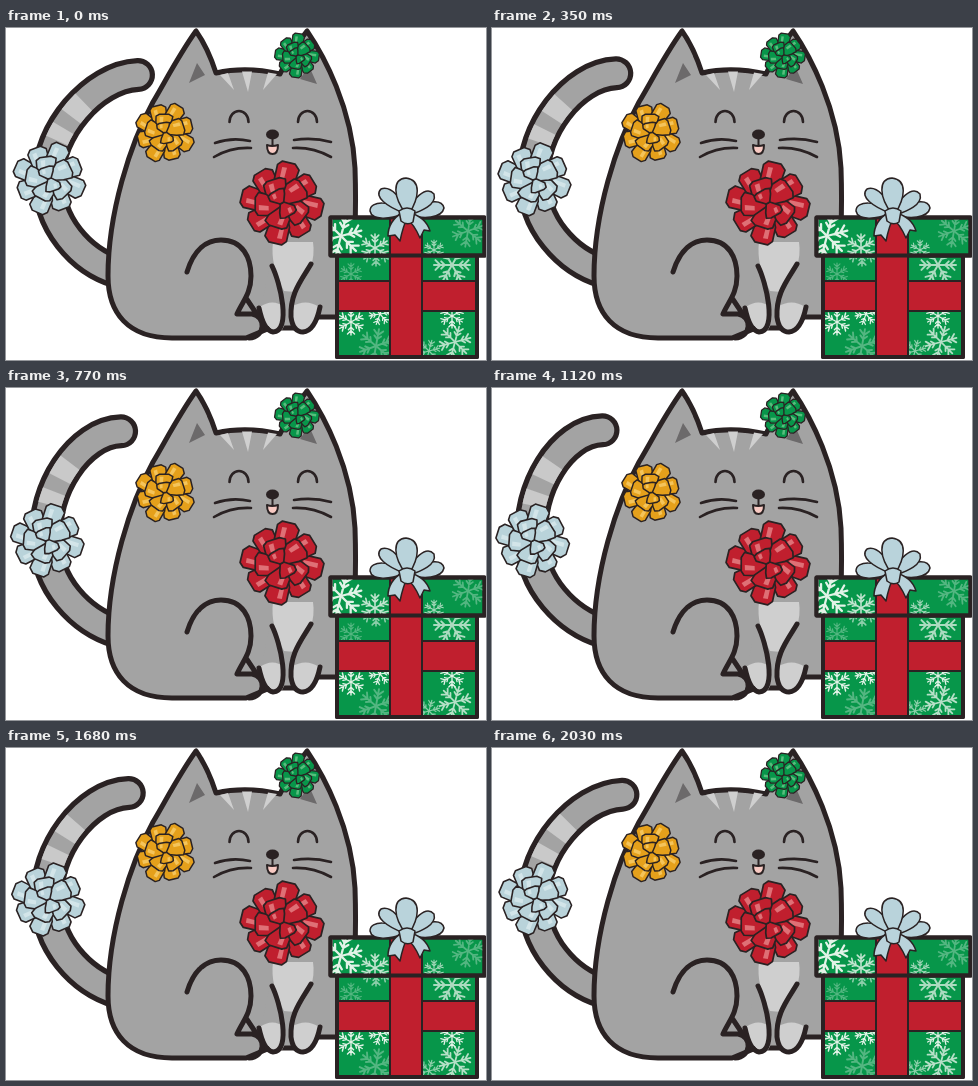
These frames come from a looping animation (480 by 332 pixels, 2100 ms). An HTML page:

```html
<!DOCTYPE html>
<html lang="en">
<head>
<meta charset="utf-8">
<title>Cat with gift bows</title>
<style>
html, body { margin: 0; width: 100%; height: 100%; overflow: hidden; background: #fff; }
svg { display: block; width: 480px; height: 332px; }
.ink { fill: none; stroke: #2a2223; stroke-width: 5; stroke-linecap: round; stroke-linejoin: round; }
.fur { fill: #a3a3a3; }
.pale { fill: #cfcfcf; }
.thin { stroke-width: 2.6; }
.edge { stroke-width: 4; }
.ribbon { fill: #c01f2e; stroke-width: 2; }
.green { fill: #07964a; }
.silver { fill: #b9d3db; stroke-width: 1.5; }
.flake { fill: none; stroke: #e2f3e7; stroke-linecap: round; }
.tail { fill: none; }
</style>
</head>
<body>
<svg viewBox="0 0 480 332">
  <defs>
    <clipPath id="lidClip"><path d="M325 190H477V226H325Z"/></clipPath>
    <clipPath id="boxClip"><path d="M333 230H469V328H333Z"/></clipPath>
  </defs>

  <path class="tail" stroke="#2a2223" stroke-width="34" stroke-linecap="round"/>
  <path class="tail" stroke="#a3a3a3" stroke-width="23.500" stroke-linecap="round"/>
  <path class="tail" stroke="#c9c9c9" stroke-width="23.500" stroke-dasharray="0 62 19 14 14 999"/>

  <path class="ink fur" d="M190 3C174 25 160 52 147 74C124 116 102 185 102 248C102 285 122 310 166 310H240L264 300H300L312 289H338Q352 230 349 140C346 80 318 28 301 3C290 17 280 32 274 46Q240 38 210 45Q202 20 190 3Z"/>
  <path fill="#6c6a6b" d="M191 35L183 55L199 47ZM303 38L294 51L311 56Z"/>
  <path class="pale" d="M214 47L222 45L228 62ZM236 43.500H246L242 64ZM262 44.500L271 46L257 62Z"/>

  <g class="ink thin">
    <path d="M223.500 94A9.500 11 0 0 1 242.500 94M292 94A9.500 11 0 0 1 311 94"/>
    <path d="M244 113Q226 109 209 115M245 120Q225 119 208 129M288 112Q307 109 325 114M287 120Q307 119 325 129"/>
    <path fill="#f7c9c2" stroke-width="2" d="M261 117Q266 119 272 117Q272 126 266.500 126Q261 126 261 117ZM266.500 109V117"/>
  </g>
  <ellipse cx="266.500" cy="106.500" rx="6.500" ry="5" fill="#2a2223"/>

  <path class="pale" d="M267 214H307Q311 240 289 264L278 263Q264 237 267 214Z"/>
  <path class="fur" d="M264 237Q274 255 279 281L255 280Z"/>
  <path class="pale" d="M254 279Q266 270 279 279Q281 295 276 302Q262 308 254 279ZM285 279Q300 270 313 279Q309 304 297 304Q285 304 285 279Z"/>
  <path class="ink" d="M266 238C274 254 286 303 267 304Q258 303 253 280M305 236C295 253 284 265 285 289Q287 304 297 304Q309 303 314 279"/>
  <path class="ink" d="M181 244C188 221 201 212 215 212C237 212 245 230 245 248C245 266 236 274 231 286H246C260 288 260 309 243 310M240 270L252 288"/>

  <g id="bows"></g>

  <path class="ink green edge" d="M331 226H471V329H331Z"/>
  <g class="flake" id="boxFlakes" clip-path="url(#boxClip)"></g>
  <path class="ink ribbon" d="M331 253H471V283H331Z"/>
  <path class="ink green edge" d="M324.500 189.500H478.500V227.500H324.500Z"/>
  <g class="flake" id="lidFlakes" clip-path="url(#lidClip)"></g>
  <path class="ink ribbon" d="M384 190V328H416V190Z"/>
  <path class="ink edge" d="M331 228V329H471V228M324.500 189.500H478.500V227.500H324.500Z"/>

  <g class="ink silver">
    <path d="M397 186C385 191 366 193 364 183C364 172 386 173 397 183Z"/>
    <path d="M405 186C416 192 436 190 438 180C436 169 416 174 405 183Z"/>
    <path d="M398 185C382 179 367 169 375 161C385 157 397 172 400 183Z"/>
    <path d="M403 184C405 172 420 157 428 166C431 177 415 183 404 187Z"/>
    <path d="M400 186C387 169 386 151 400 150C416 152 413 170 403 186Z"/>
    <path d="M397 184Q382 193 382 208L389 207L394 213Q397 198 402 188Z"/>
    <path d="M402 184Q420 189 424 203L418 202L414 210Q408 196 400 190Z"/>
    <path d="M393 183Q401 177 409 183L407 194Q401 198 395 193Z"/>
  </g>
</svg>
<script>
const $ = s => document.querySelector(s);

// A loop of ribbon pointing along +x, with a shiny strip near its end.
function petal(angle, len, width, line, [base, light]) {
  const pts = list => list.map(([x, y]) => [(x * len).toFixed(1), (y * width).toFixed(1)]).join(' ');
  const body = [[0, -.2], [.55, -.95], [.9, -.9], [1, -.55], [.98, .5], [.85, .9], [.5, .7], [0, .2]];
  const shine = [[.5, -.55], [.86, -.5], [.86, -.1], [.5, -.2]];
  return `<g transform="rotate(${angle})">
    <polygon class="ink" style="fill:${base};stroke-width:${line}" points="${pts(body)}"/>
    <polygon fill="${light}" points="${pts(shine)}"/></g>`;
}

function bow(x, y, r, turn, colors) {
  const line = .8 + r * .022;
  const ring = (n, shift, len, width) => Array.from({ length: n }, (_, i) =>
    petal(turn + shift + i * 360 / n, r * len * (i % 2 ? .93 : 1), r * width, line, colors)).join('');
  return `<g transform="translate(${x} ${y})">` +
    ring(8, 0, 1.01, .3) + ring(5, 24, .66, .31) + ring(2, 50, .36, .24) + '</g>';
}

function flake(x, y, r, turn = 0, opacity = 1) {
  const barb = (a, b) => `M${-r * a} ${-r * b}L0 ${-r * (b - a)}L${r * a} ${-r * b}`;
  let out = '';
  for (let i = 0; i < 6; i++)
    out += `<path transform="rotate(${turn + i * 60})" d="M0 0V${-r}${barb(.27, .92)}${barb(.2, .6)}"/>`;
  return `<g transform="translate(${x} ${y})" opacity="${opacity}" stroke-width="${r * .11}">${out}</g>`;
}

$('#bows').innerHTML =
  bow(276, 175, 41, 10, ['#c01f2e', '#df7076']) +
  bow(159, 104.5, 30, 28, ['#e5a01b', '#f4c45b']) +
  bow(291, 27.5, 22, 5, ['#08964a', '#58bd7d']) +
  '<g id="tailBow">' + bow(0, 0, 36, 20, ['#b9d3da', '#d3e5e9']) + '</g>';

$('#lidFlakes').innerHTML =
  flake(335, 208, 21, 15) + flake(369, 220, 14, 0, .85) +
  flake(428, 222, 10, 0, .7) + flake(462, 203, 16, 10, .35);
$('#boxFlakes').innerHTML =
  flake(345, 246, 11, 0, .35) + flake(370, 224, 14, 0, .6) + flake(446, 237, 18, 30, .75) +
  flake(345, 294, 13) + flake(374, 286, 11, 20) + flake(370, 318, 17, 10, .35) +
  flake(446, 288, 12) + flake(449, 314, 16, 15, .8) + flake(423, 323, 11, 15, .6);

// Control points of the tail at both ends of its swing.
const right = [132, 47, 87, 49, 41, 105, 43, 150, 41, 195, 75, 233, 112, 244];
const left = [109, 42, 68, 43, 34, 102, 39.8, 152.5, 39, 196, 75, 233, 112, 244];
const tails = document.querySelectorAll('.tail');
const loop = 2100, step = 70;

function draw(now) {
  const t = Math.floor(now % loop / step) * step;
  const p = 1 - Math.abs(1 - 2 * t / loop);
  const c = right.map((v, i) => v + (left[i] - v) * p);
  const d = `M${c.slice(0, 2)}C${c.slice(2)}`;
  tails.forEach(path => path.setAttribute('d', d));
  $('#tailBow').setAttribute('transform',
    `translate(${43.5 - 3 * p} ${150.5 + 2.5 * p}) rotate(${-7 * p})`);
}

const start = performance.now();
function tick() {
  draw(performance.now() - start);
  requestAnimationFrame(tick);
}
tick();
</script>
</body>
</html>
```
